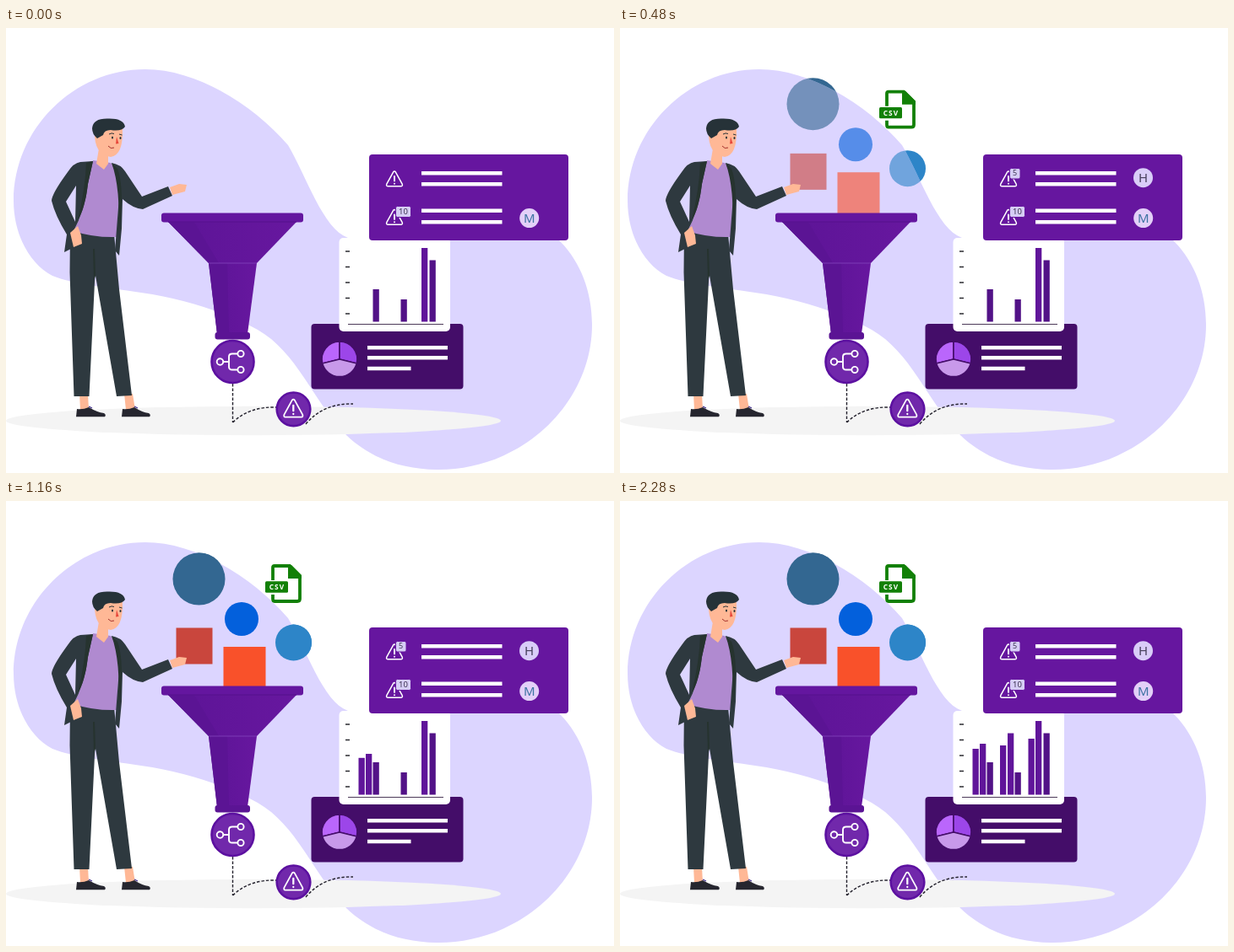
These frames come from a looping animation (720 px wide and 528 px high, 3.48 s). An HTML page:

```html
<!DOCTYPE html>
<html lang="en">
<head>
<meta charset="utf-8">
<title>Data funnel</title>
<style>
html, body { margin: 0; width: 100%; height: 100%; overflow: hidden; background: #fff; }
svg { display: block; width: 720px; height: 528px; }
text { font-family: "Noto Sans", "Open Sans", sans-serif; text-anchor: middle; }
.suit { fill: #2e393f; }
.lapel { fill: #26332f; }
.skin { fill: #ffb896; }
.line { fill: none; stroke: #fff; stroke-linecap: round; stroke-linejoin: round; }
.dash { fill: none; stroke: #25232e; stroke-width: 1.4; stroke-dasharray: 3.5 2; }
</style>
</head>
<body>
<svg viewBox="0 0 720 528">
  <defs>
    <path id="blob" d="M165 49C80 49 9 120 9 205C9 245 28 280 55 294C80 304 115 307 160 314C215 322 260 338 298 358C345 385 362 440 403 483C432 511 470 524 512 524C612 524 694 445 694 352C694 311 679 275 654 251C600 235 450 262 405 249C375 238 356 176 334 139C292 90 225 49 165 49Z"/>
    <clipPath id="inBlob"><use href="#blob"/></clipPath>
    <linearGradient id="metal">
      <stop offset="0" stop-color="#5c1496"/>
      <stop offset="1" stop-color="#67179f"/>
    </linearGradient>
    <g id="sources"></g>
    <g id="warn">
      <path class="line" stroke-width="1.5" d="M-1.3 -8.2Q0 -10 1.3 -8.2L9.2 6.2Q10 8.6 8 8.8H-8Q-10 8.6 -9.2 6.2Z"/>
      <path class="line" stroke-width="1.9" d="M0 -3V2.4M0 5.6V5.7"/>
    </g>
  </defs>

  <use id="outer" href="#sources"/>
  <use href="#blob" fill="#dcd5ff"/>
  <g id="inner"><use href="#sources"/></g>
  <g id="file">
    <path d="M316 94V79Q316 77 318 77H336L348 89V116Q348 119 345 119H318Q316 119 316 116V111" fill="none" stroke="#128007" stroke-width="3.8"/>
    <path d="M334 76H338L350 88V92H334Z" fill="#128007"/>
    <rect x="307" y="95.3" width="27" height="13.4" rx="1.5" fill="#128007"/>
    <text x="321" y="105" font-size="8.3" font-weight="700" letter-spacing="1.1" fill="#fff">CSV</text>
  </g>
  <ellipse cx="293" cy="466" rx="293" ry="17.2" fill="#f4f4f4"/>

  <g id="man">
    <path class="skin" d="M87 434H97L98 453H88ZM140 434H150L153 453H142Z"/>
    <path d="M84 452Q91 453 98 450Q108 456 116 457Q119 459 117 461.3H83ZM138 452Q145 453 152 450Q161 456 169 457Q172 459 170 461.3H137Z" fill="#26262f"/>
    <path d="M98 449L102 451M152 449L156 451" stroke="#3c2a8a" stroke-width="1.2"/>
    <path class="suit" d="M76 240L128 244L134 310L149 436L131 437L105.500 291L98.500 437L80.500 437L75.500 290Z"/>
    <path class="lapel" d="M103 262H105L106 294L104 300Z"/>
    <path d="M103 157L124 160L134 172L132 248Q104 249 80 241Q94 215 97 180Z" fill="#b08ad0"/>
    <path class="suit" d="M103 158L88 159Q80 160 73 171Q54 197 54 205Q58 222 72 245L69 266L77 262L79 243Q94 215 97 185ZM83 187L82 230L71 206Z" fill-rule="evenodd"/>
    <path class="lapel" d="M103 158L95 160Q94 190 85 228Q94 213 97 185Z"/>
    <path class="suit" d="M125 160Q136 162 141 170L161 200L192 188L197 199L162 215Q150 214 138 203L137 238L134 270L129 264L134 200Q134 178 125 160Z"/>
    <path class="lapel" d="M125 160L132 167Q139 185 136 225L133 246Q136 190 125 160Z"/>
    <path class="skin" d="M76 243L85 235L89 246L90 256L80 260Z"/>
    <path class="skin" d="M194 189L205 185L214 186L212 194L197 198Z"/>
    <path class="skin" d="M110 143L121 151V161L116 168L107 161Z"/>
    <path class="skin" d="M105 123Q104 150 124 153Q139 151 138 119L112 116Z"/>
    <path d="M102 119Q103 107 121 107.500Q139 107 141 117Q137 123 124 121Q116 121 115 127L108 131Q102 126 102 119Z" fill="#263238"/>
    <ellipse cx="126" cy="130" rx="1" ry="1.6" fill="#263238"/>
    <ellipse cx="135.500" cy="130.500" rx="1" ry="1.6" fill="#263238"/>
    <path d="M122 126Q125 124 128 125.500M134 126L137.500 127" fill="none" stroke="#263238"/>
    <path d="M131 129L133.500 137L130 137.500Z" fill="#e8483b"/>
    <path d="M121 140Q124 144 128 142" fill="none" stroke="#a32f2a"/>
  </g>

  <g id="funnel" fill="#64169f">
    <path d="M191 229H345L297 279H240Z" fill="url(#metal)"/>
    <path d="M191 229H222L252 279H240Z" fill="#5b1494"/>
    <path d="M240 279H297L286 363H250Z" fill="url(#metal)"/>
    <path d="M240 279H262L264 363H250Z" fill="#5b1494"/>
    <path d="M240 279H297" stroke="#8546bd" stroke-width=".8"/>
    <rect x="184" y="219.5" width="168" height="11" rx="3"/>
    <path d="M192 230H344" stroke="#54108b"/>
    <rect x="247.500" y="361" width="41.500" height="8.500" rx="3" fill="#5b1494"/>
  </g>

  <path class="dash" d="M268.5 422V468"/>
  <path class="dash" d="M268.5 468Q288 449 320 450"/>
  <path class="dash" d="M355 470Q376 445 411 446"/>
  <circle cx="268.500" cy="396" r="25" fill="#7128ab" stroke="#5c10a0" stroke-width="2.600"/>
  <g class="line" stroke-width="1.900">
    <circle cx="253.500" cy="396" r="3.800"/>
    <circle cx="278" cy="386.500" r="3.600"/>
    <circle cx="278" cy="405.500" r="3.600"/>
    <path d="M257.500 396H264M274 386.500H268Q264 386.500 264 390V402Q264 405.500 268 405.500H274"/>
  </g>
  <circle cx="340.500" cy="452.300" r="19.800" fill="#7128ab" stroke="#5c10a0" stroke-width="2.600"/>
  <use href="#warn" transform="translate(340.3 451.3) scale(1.18)"/>

  <rect x="361.500" y="351" width="180" height="77.500" rx="4" fill="#440d69"/>
  <g stroke="#440d69" stroke-width="1.600">
    <path d="M395 393V372A21 21 0 0 0 374.700 398Z" fill="#ba66fc"/>
    <path d="M395 393V372A21 21 0 0 1 415.300 398Z" fill="#9c46e9"/>
    <path d="M395 393L374.700 398A21 21 0 0 0 415.300 398Z" fill="#c899ea"/>
  </g>
  <rect x="394.500" y="249" width="131.500" height="111" rx="5" fill="#fff"/>
  <path d="M405 351.500H518" stroke="#4c3a58"/>
  <path id="ticks" stroke="#2b2b30" stroke-width="1.500"/>
  <g id="bars"></g>

  <rect x="430" y="150" width="236" height="102" rx="4" fill="#66169f"/>
  <path id="rules" fill="#fff"/>
  <use href="#warn" x="460" y="179"/>
  <use href="#warn" x="460" y="224.500"/>
  <g id="alert">
    <rect x="461.500" y="166.500" width="12.500" height="12.500" rx="2" fill="#d6cdf5" stroke="#66169f"/>
    <text x="467.700" y="175.400" font-size="9" fill="#3b3350">5</text>
    <circle cx="619.500" cy="177.700" r="11.500" fill="#d9cdf8"/>
    <text x="619.500" y="183" font-size="15" fill="#47405c">H</text>
  </g>
  <rect x="461.500" y="211.500" width="18" height="13" rx="2" fill="#d6cdf5" stroke="#66169f"/>
  <text x="470.500" y="221.200" font-size="9.500" fill="#3b3350">10</text>
  <circle cx="619.700" cy="225.600" r="11.500" fill="#e3d0f8"/>
  <text x="619.700" y="231" font-size="15" fill="#3f74a3">M</text>
</svg>
<script>
const LOOP = 3480, STEP = 40, BASE = 348.5;
const byId = id => document.getElementById(id);
const clamp = v => Math.min(1, Math.max(0, v));
const smooth = (t, from, to) => {
  const u = clamp((t - from) / (to - from));
  return u * u * (3 - 2 * u);
};
function add(parent, tag, attrs) {
  const el = document.createElementNS("http://www.w3.org/2000/svg", tag);
  for (const k in attrs) el.setAttribute(k, attrs[k]);
  return parent.appendChild(el);
}

// shape, centre x, centre y, half size, colour, drop height
const sources = [
  ["circle", 228.5, 92.5, 31, "#336791", 26],
  ["circle", 279, 140, 20, "#0360dc", 20],
  ["rect", 223, 172, 21.5, "#c9463d", 18],
  ["circle", 340.5, 168, 21.5, "#2d85c8", 15],
  ["rect", 282.5, 198, 25, "#f9512a", 20]
].map(([tag, x, y, r, fill, drop]) => ({
  drop,
  el: add(byId("sources"), tag, tag === "circle"
    ? { cx: x, cy: y, r, fill }
    : { x: x - r, y: y - r, width: 2 * r, height: 2 * r, fill })
}));

// x, height, growth start, growth end (no times: always full)
const bars = [
  [417.5, 54.5, 560, 1400], [426, 60.5, 560, 1400], [434.5, 38.5],
  [450, 58.5, 1320, 2290], [459, 73, 1320, 2290], [467.5, 26.5],
  [483.5, 66.5, 1320, 2290], [492, 87.5], [501.5, 73]
].map(([x, h, from, to], i) => ({
  h, from, to,
  el: add(byId("bars"), "rect", { x, width: 7.3, fill: i % 3 === 2 ? "#521287" : "#60159a" })
}));

byId("ticks").setAttribute("d", [0, 1, 2, 3, 4].map(i => `M402 ${265 + i * 18.5}h5`).join(""));
byId("rules").setAttribute("d", [
  [492, 170, 95.5], [492, 183, 95.5], [492, 214.5, 95.5], [492, 228, 95.5],
  [428, 377, 95], [428, 389, 95], [428, 401.7, 51.5]
].map(([x, y, w]) => `M${x} ${y}h${w}v4.500h${-w}z`).join(""));

function draw(t) {
  const alpha = clamp(t / 780);
  const solid = alpha >= 0.5 ? "visible" : "hidden";
  const left = Math.pow(1 - clamp(t / 600), 1.5);
  // While fading, only the part over the blob is translucent.
  byId("inner").setAttribute("clip-path", alpha < 1 ? "url(#inBlob)" : "none");
  byId("inner").setAttribute("opacity", alpha);
  byId("outer").setAttribute("visibility", solid);
  byId("file").setAttribute("visibility", solid);
  byId("file").setAttribute("transform", `translate(0 ${-15 * left})`);
  for (const s of sources) s.el.setAttribute("transform", `translate(0 ${-s.drop * left})`);
  byId("alert").setAttribute("opacity", clamp(t / 390));
  for (const b of bars) {
    const h = b.from === undefined ? b.h : b.h * smooth(t, b.from, b.to);
    b.el.setAttribute("y", BASE - h);
    b.el.setAttribute("height", h);
  }
}

const start = performance.now();
function tick() {
  const t = (performance.now() - start) % LOOP;
  draw(Math.floor(t / STEP) * STEP);
  requestAnimationFrame(tick);
}
tick();
</script>
</body>
</html>
```
